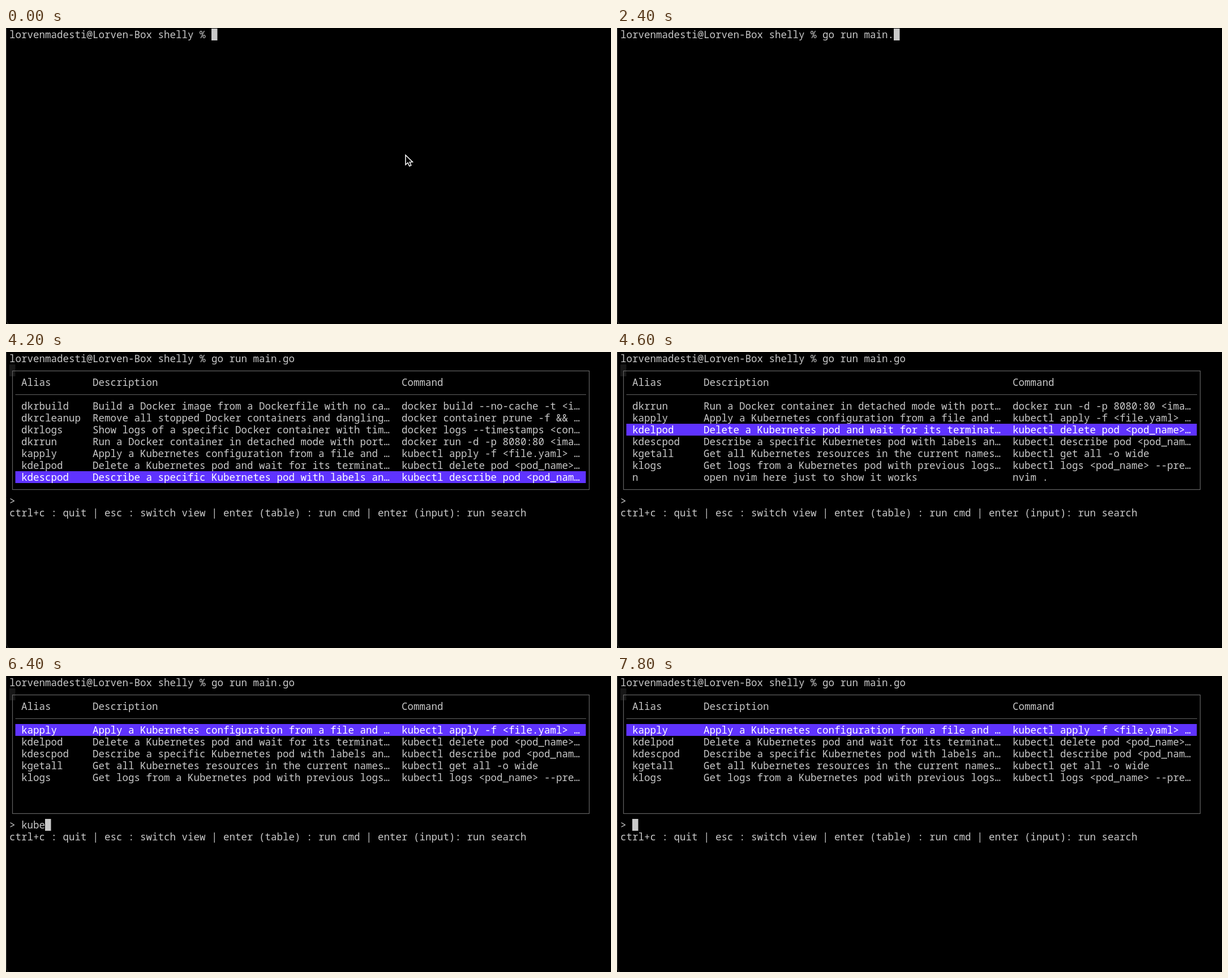
An HTML page with a canvas for the animation above (8000 ms loop, 1069x524 px).

```html
<!DOCTYPE html>
<html lang="en">
<head>
<meta charset="utf-8">
<title>Terminal table</title>
<style>
  html, body { margin: 0; width: 100%; height: 100%; overflow: hidden; background: #000; }
  canvas { display: block; }
</style>
</head>
<body>
<canvas id="stage" width="1069" height="524"></canvas>
<script>
const ctx = document.getElementById('stage').getContext('2d');
const LOOP = 8000, TICK = 200;
const CELL_W = 10.5, CELL_H = 21, VISIBLE = 7;
const TEXT = '#c9c9c9', LINE = '#626262', ACCENT = '#5f33ff';

const PROMPT = 'lorvenmadesti@Lorven-Box shelly % ';
const COMMAND = 'go run main.go';
const HELP = 'ctrl+c : quit | esc : switch view | enter (table) : run cmd | enter (input): run search';
const HEADER = ['Alias', 'Description', 'Command'];
const COLUMNS = [2, 14, 66];
const ROWS = [
  ['dkrbuild', 'Build a Docker image from a Dockerfile with no ca…', 'docker build --no-cache -t <i…'],
  ['dkrcleanup', 'Remove all stopped Docker containers and dangling…', 'docker container prune -f && …'],
  ['dkrlogs', 'Show logs of a specific Docker container with tim…', 'docker logs --timestamps <con…'],
  ['dkrrun', 'Run a Docker container in detached mode with port…', 'docker run -d -p 8080:80 <ima…'],
  ['kapply', 'Apply a Kubernetes configuration from a file and …', 'kubectl apply -f <file.yaml> …'],
  ['kdelpod', 'Delete a Kubernetes pod and wait for its terminat…', 'kubectl delete pod <pod_name>…'],
  ['kdescpod', 'Describe a specific Kubernetes pod with labels an…', 'kubectl describe pod <pod_nam…'],
  ['kgetall', 'Get all Kubernetes resources in the current names…', 'kubectl get all -o wide'],
  ['klogs', 'Get logs from a Kubernetes pod with previous logs…', 'kubectl logs <pod_name> --pre…'],
  ['n', 'open nvim here just to show it works', 'nvim .']
];
const KUBE_ROWS = ROWS.filter(row => row[1].includes('Kubernetes'));

// Each entry holds from its start time until the next one.
const SELECTION = [[0, 0], [4000, 2], [4200, 6], [4400, 9], [4600, 5], [4800, 2], [5000, 0],
  [6800, 2], [7000, 3], [7200, 1], [7400, 0]];
const QUERY = [[0, ''], [5800, 'ku'], [6000, 'kub'], [6200, 'kube'], [7800, '']];
const INPUT_FOCUS = [[0, false], [5200, true], [6600, false], [7600, true]];

const valueAt = (track, t) => track.filter(([start]) => start <= t).pop()[1];
const colX = col => 6 + col * CELL_W;
const rowY = row => 1 + row * CELL_H;

function write(text, col, row, color = TEXT) {
  ctx.fillStyle = color;
  ctx.fillText(text, colX(col), rowY(row) + 17);
}

function block(col, row, color = TEXT, cols = 1) {
  ctx.fillStyle = color;
  ctx.fillRect(colX(col), rowY(row), cols * CELL_W, CELL_H);
}

function writeCells(cells, row, color) {
  cells.forEach((text, i) => write(text, COLUMNS[i], row, color));
}

function drawWindowEdge() {
  ctx.strokeStyle = '#3c3c3c';
  ctx.lineWidth = 1;
  ctx.beginPath();
  ctx.moveTo(0.5, 0);
  ctx.lineTo(0.5, 515);
  ctx.quadraticCurveTo(0.5, 521, 4, 524);
  ctx.stroke();
}

function drawPointer(x, y) {
  ctx.save();
  ctx.translate(x, y);
  ctx.beginPath();
  [[0, 0], [0, 17], [4, 13.5], [6.8, 19.5], [9.8, 18.2], [7.2, 12.5], [12.4, 12.2]]
    .forEach(([px, py]) => ctx.lineTo(px, py));
  ctx.closePath();
  ctx.fillStyle = '#000';
  ctx.fill();
  ctx.strokeStyle = '#fff';
  ctx.lineWidth = 1.5;
  ctx.stroke();
  ctx.restore();
}

function drawShell(t) {
  const typed = t < 1400 ? 0 : t <= 2400 ? 2 * ((t - 1200) / TICK) : 12 + (t - 2400) / TICK;
  const count = Math.min(COMMAND.length, typed);
  write(PROMPT + COMMAND.slice(0, count), 0, 0);
  if (t < 3200) block(PROMPT.length + count, 0);
  else block(0, 1, t < 3400 ? TEXT : '#171717');
}

function drawTable(t) {
  const rows = t >= 6400 ? KUBE_ROWS : ROWS;
  const selected = valueAt(SELECTION, t);
  const bottom = Math.max(0, rows.length - VISIBLE);
  // Scrolling down pins the selection last; scrolling up pins it first.
  const offset = t < 4400 ? Math.max(0, selected - VISIBLE + 1) : Math.min(bottom, selected);

  ctx.strokeStyle = LINE;
  ctx.lineWidth = 1.2;
  ctx.strokeRect(11.5, 33.5, 1019, 210);
  ctx.beginPath();
  ctx.moveTo(16.5, 75.5);
  ctx.lineTo(1025, 75.5);
  ctx.stroke();

  writeCells(HEADER, 2);
  rows.slice(offset, offset + VISIBLE).forEach((cells, i) => {
    const active = offset + i === selected;
    if (active) block(1, 4 + i, ACCENT, 96);
    writeCells(cells, 4 + i, active ? '#fff' : TEXT);
  });

  const query = valueAt(QUERY, t);
  write('> ' + query, 0, 12);
  if (valueAt(INPUT_FOCUS, t)) block(2 + query.length, 12);
  write(HELP, 0, 13);
}

function frame(now) {
  const t = Math.floor((now % LOOP) / TICK) * TICK;
  ctx.fillStyle = '#000';
  ctx.fillRect(0, 0, 1069, 524);
  ctx.font = '17.5px "Noto Sans Mono", "DejaVu Sans Mono", monospace';
  drawWindowEdge();
  drawShell(t);
  if (t < 800) drawPointer(706, 225);
  if (t >= 3400) drawTable(t);
  requestAnimationFrame(frame);
}
requestAnimationFrame(frame);
</script>
</body>
</html>
```
